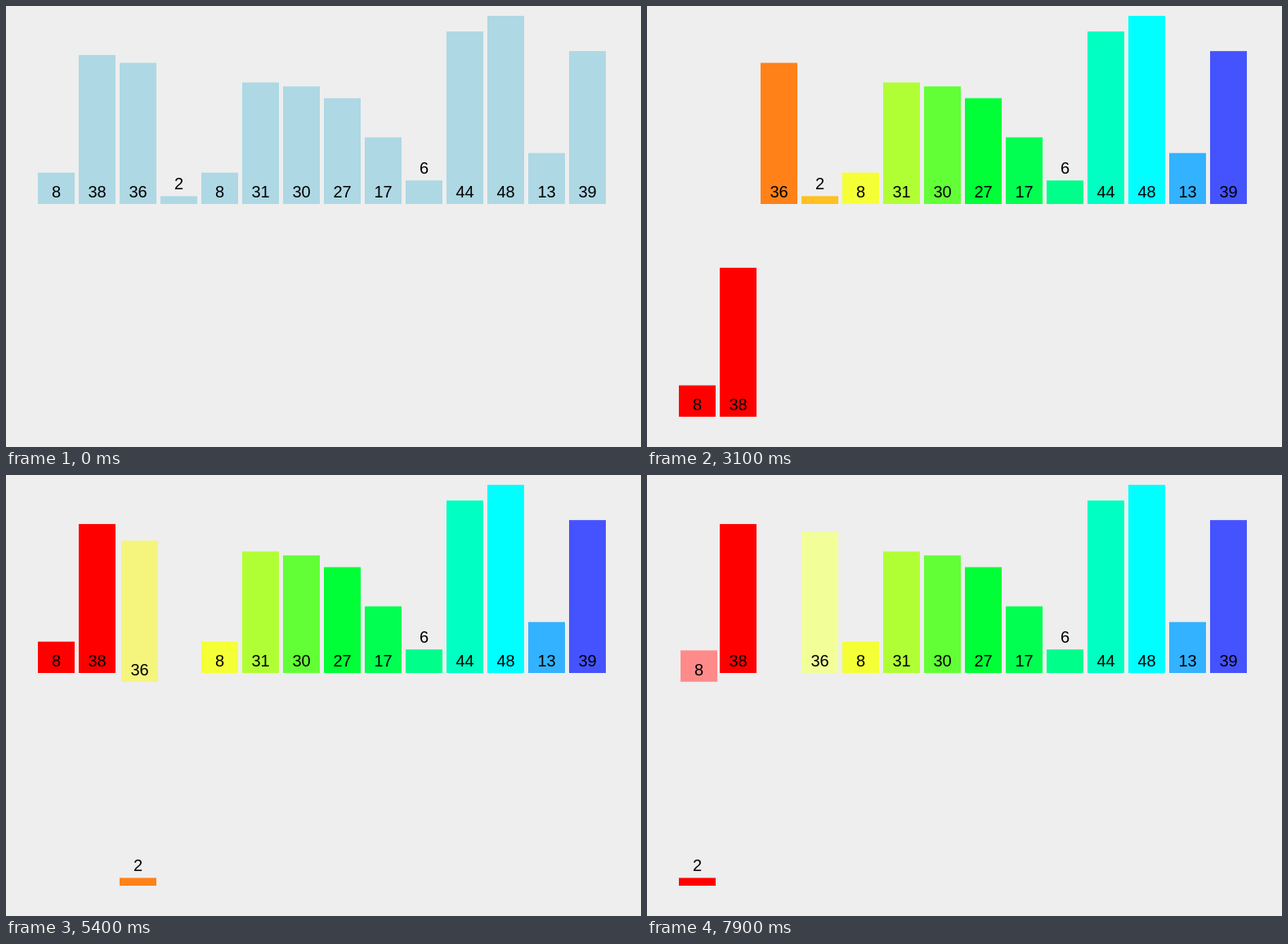
These frames come from a looping animation (777 by 539 pixels, 8000 ms). An HTML page with a canvas:

```html
<!DOCTYPE html>
<html lang="en">
<head>
<meta charset="utf-8">
<title>Merge sort</title>
<style>
  html, body { margin: 0; width: 100%; height: 100%; overflow: hidden; background: #eee; }
  canvas { display: block; }
</style>
</head>
<body>
<canvas id="stage" width="777" height="539"></canvas>
<script>
const ctx = document.getElementById('stage').getContext('2d');
const LOOP = 8000, TICK = 100, DURATION = 230;
const BASE = 242, DROP = 260, UNIT = 230 / 48;

const values = [8, 38, 36, 2, 8, 31, 30, 27, 17, 6, 44, 48, 13, 39];
const rgb = hex => [1, 3, 5].map(i => parseInt(hex.slice(i, i + 2), 16));
const palette = text => text.split(' ').map(rgb);

const plain = rgb('#aed8e4'), red = rgb('#ff0000'), orange = rgb('#ff8118');
const palePink = rgb('#ff9090'), paleYellow = rgb('#f5fa82'), paleLime = rgb('#f2ff98');
const vivid = palette('#fb0018 #f93c1a #f78e25 #f8c32e #f0fb36 #b0ff35 #66ff36 ' +
  '#00ff36 #00ff4f #00ff8c #00ffc8 #00ffff #32b0fc #4564fb');
const settled = palette('#ff9090 #fcdc9b #ff8118 #ffc020 #f5ff35 #b0ff35 #62ff36 ' +
  '#00ff36 #00ff50 #00ff8a #00ffc2 #00ffff #33b2ff #4553ff');

// Each step: start time, bar, properties it moves to
const tint = (time, bar, color) => [time, bar, { color }];
const drop = (time, bar, slot, color) => [time, bar, { slot: [slot], y: [DROP], color }];
const lift = (time, bar) => [time, bar, { y: [0] }];

const steps = [
  ...settled.map((color, i) => tint(1780, i, color)),
  drop(2380, 0, 0, red),
  drop(2850, 1, 1, red),
  lift(3350, 0),
  lift(3842, 1),
  tint(4280, 2, paleYellow),
  tint(4280, 3, paleYellow),
  drop(4850, 3, 2, orange),
  drop(5350, 2, 3, orange),
  lift(5901, 3),
  lift(6350, 2),
  tint(6780, 0, palePink),
  tint(6780, 3, paleLime),
  drop(7350, 3, 0, red),
  tint(7350, 2, paleLime),
  drop(7850, 0, 1, red)
];

const ease = t => t < 0.5 ? 4 * t ** 3 : 1 - 4 * (1 - t) ** 3;
const mix = (from, to, p) => from.map((v, i) => v + (to[i] - v) * p);

function barsAt(time) {
  const bars = values.map((value, i) => ({
    value, slot: [i], y: [0], color: time < 1500 ? plain : vivid[i]
  }));
  for (const [start, index, target] of steps) {
    if (time <= start) continue;
    const p = ease(Math.min(1, (time - start) / DURATION));
    for (const key in target) bars[index][key] = mix(bars[index][key], target[key], p);
  }
  return bars;
}

function drawBar({ value, slot, y, color }) {
  const x = 39 + 50 * slot[0], height = value * UNIT, bottom = BASE + y[0];
  ctx.fillStyle = `rgb(${color.map(Math.round)})`;
  ctx.fillRect(x, bottom - height, 45, height);
  ctx.fillStyle = '#000';
  ctx.fillText(value, x + 22.5, bottom - 8 - (value < 8 ? height : 0));
}

function frame(now) {
  const time = Math.floor(now % LOOP / TICK) * TICK;
  ctx.fillStyle = '#eee';
  ctx.fillRect(0, 0, 777, 539);
  ctx.font = '20px "Liberation Sans", Arial, sans-serif';
  ctx.textAlign = 'center';
  barsAt(time).forEach(drawBar);
}

const origin = performance.now();
function loop() {
  frame(performance.now() - origin);
  requestAnimationFrame(loop);
}
loop();
</script>
</body>
</html>
```
